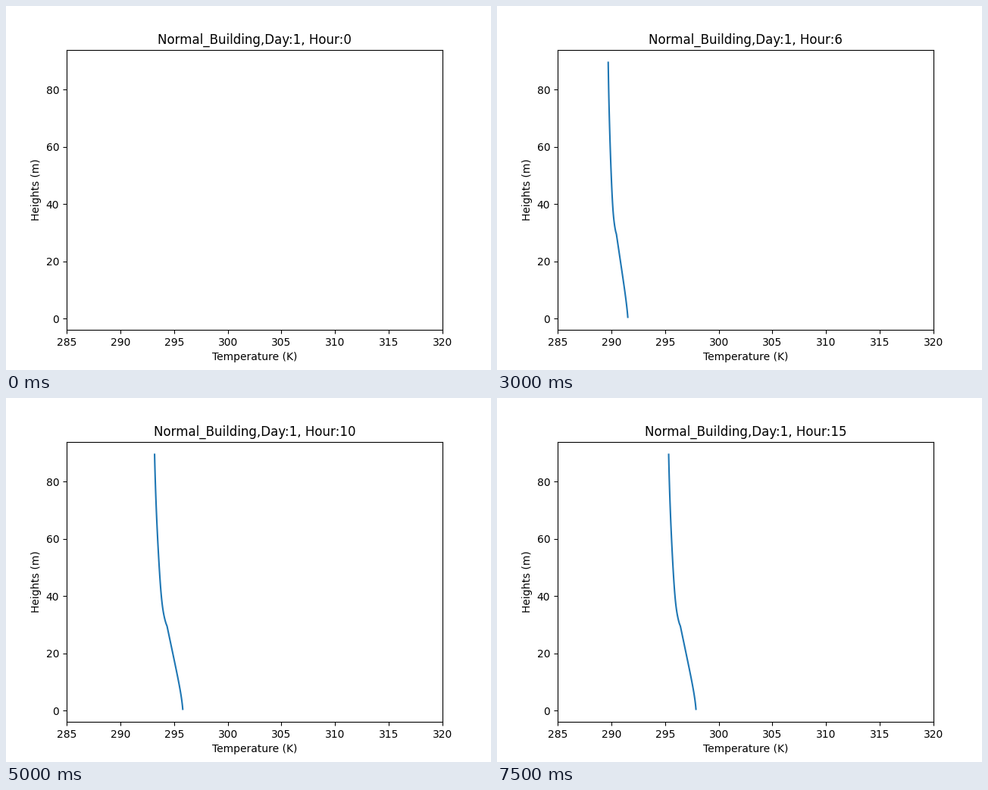
Write a matplotlib script that moves like this. It is 640 px wide and 480 px high and loops after 8000 ms.

```python
import numpy as np
import matplotlib.pyplot as plt
from matplotlib.animation import FuncAnimation

HOURS = 16
TOP, ROOF, GROUND = 89.5, 29.5, 0.5
heights = np.arange(GROUND, TOP + 1)

# Hour, temperature at the top, gain down to the roof, gain down to the ground
knots = np.array([
    (1, 291.30, 0.50, 1.80),
    (4, 289.18, 1.12, 2.91),
    (6, 289.71, 0.69, 1.06),
    (8, 291.60, 1.66, 1.22),
    (10, 293.19, 1.06, 1.46),
    (13, 295.02, 2.54, 1.57),
    (15, 295.34, 0.99, 1.45),
])
times, levels = knots[:, 0], knots[:, 1:]
slopes = np.gradient(levels, times, axis=0)


def smooth(hour):
    """Cubic Hermite curve through the knots."""
    i = min(np.searchsorted(times, hour, side="right"), len(times) - 1) - 1
    span = times[i + 1] - times[i]
    t = (hour - times[i]) / span
    ease = t * t * (3 - 2 * t)
    return (levels[i] * (1 - ease) + levels[i + 1] * ease
            + span * t * (1 - t) * (slopes[i] * (1 - t) - slopes[i + 1] * t))


def profile(hour):
    top, above, below = smooth(hour)
    s = np.clip((TOP - heights) / (TOP - ROOF - 1), 0, 1)
    u = np.clip((ROOF - heights) / (ROOF - GROUND), 0, 1)
    bend, step = 0.08 * below, 0.07 * below
    # Gentle curve in open air that bends sharply just over the roof
    air = above * (0.33 * s + 0.42 * s**2 + 0.25 * s**14)
    # Nearly straight beside the walls, vertical at the ground
    street = below * ((1 + bend) * u - bend * u**6)
    return top + air + step * (heights <= ROOF) + street


fig, ax = plt.subplots(figsize=(6.4, 4.8), dpi=100)
line, = ax.plot([], [])
margin = 0.05 * (TOP - GROUND)
ax.set_xlim(285, 320)
ax.set_ylim(GROUND - margin, TOP + margin)
ax.set_xlabel("Temperature (K)")
ax.set_ylabel("Heights (m)")
title = ax.set_title("")


def update(hour):
    if hour:
        line.set_data(profile(hour), heights)
    else:
        line.set_data([], [])
    title.set_text(f"Normal_Building,Day:1, Hour:{hour}")
    return line, title


anim = FuncAnimation(fig, update, frames=HOURS, interval=500,
                     repeat=True, repeat_delay=0, blit=False)
plt.show()
```
